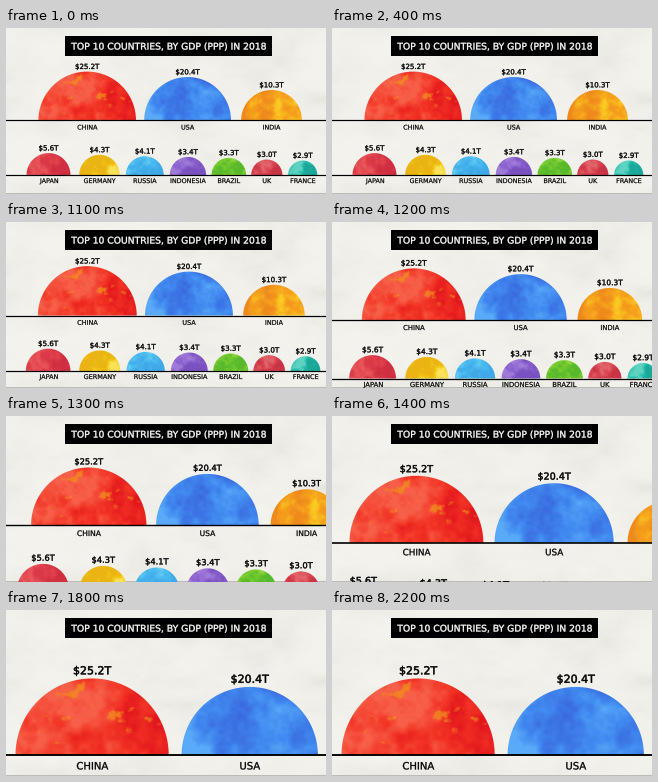
Animation, 320 px wide and 166 px high, one loop 2.3 s. Source, as a matplotlib script:

```python
import numpy as np
import matplotlib.pyplot as plt
from matplotlib.animation import FuncAnimation
from matplotlib.colors import LinearSegmentedColormap, to_rgb
from matplotlib.patches import PathPatch, Rectangle
from matplotlib.path import Path
from matplotlib.textpath import TextPath
from matplotlib.transforms import Affine2D

W, H, DPI = 320, 166, 100
FRAMES, STEP = 23, 100
PX = 72 / DPI
FOCUS_X, MAX_ZOOM = 72.6, 1.57
ZOOM_START, ZOOM_TIME = 960, 790
ROW1, ROW2 = 92.4, 147.1

rng = np.random.default_rng(18)

# name, value, centre x, radius, base line, angle of the light side, colours
COUNTRIES = [
    ("CHINA", "$25.2T", 81.2, 48.8, ROW1, 160, ("#f75f48", "#f23324", "#e3161d")),
    ("USA", "$20.4T", 181.6, 43.4, ROW1, 225, ("#59aaf8", "#4189f0", "#3a6be0")),
    ("INDIA", "$10.3T", 265.5, 30.4, ROW1, -35, ("#fbcb22", "#f6a01c", "#ee8a1c")),
    ("JAPAN", "$5.6T", 42.5, 22, ROW2, 150, ("#ea5a5c", "#de3d4a", "#cf2f40")),
    ("GERMANY", "$4.3T", 93.5, 20.3, ROW2, -40, ("#fae25a", "#f4c916", "#eab414")),
    ("RUSSIA", "$4.1T", 138.8, 18.9, ROW2, 150, ("#74d0f7", "#4cbdf1", "#3fa9e8")),
    ("INDONESIA", "$3.4T", 181.9, 18.2, ROW2, 150, ("#a17bd8", "#8b62cf", "#7a51c0")),
    ("BRAZIL", "$3.3T", 222.8, 17.3, ROW2, 150, ("#96d94c", "#76cb2e", "#58b92c")),
    ("UK", "$3.0T", 260.8, 15.6, ROW2, 150, ("#e2666c", "#d9434f", "#c83445")),
    ("FRANCE", "$2.9T", 296.7, 14.6, ROW2, 150, ("#5fd3c2", "#27bfae", "#1ba899")),
]


def noise(h, w, cells, octaves=4):
    """Smooth fractal noise scaled to 0..1."""
    total = np.zeros((h, w))
    for k in range(octaves):
        n = cells * 2 ** k
        grid = rng.random((n + 1, n + 1))
        y = np.linspace(0, n - 1e-6, h)[:, None]
        x = np.linspace(0, n - 1e-6, w)[None, :]
        j, i = y.astype(int), x.astype(int)
        fy, fx = (f * f * (3 - 2 * f) for f in (y - j, x - i))
        top = grid[j, i] * (1 - fx) + grid[j, i + 1] * fx
        low = grid[j + 1, i] * (1 - fx) + grid[j + 1, i + 1] * fx
        total += (top * (1 - fy) + low * fy) * 0.55 ** k
    return (total - total.min()) / np.ptp(total)


def wash(colors, size, angle):
    """Watercolour patch, with u and v running over the disc."""
    u, v = np.meshgrid(np.linspace(-1.1, 1.1, size), np.linspace(1.1, -1.1, size))
    a = np.radians(angle)
    light = u * np.cos(a) + (v - 0.45) * np.sin(a)
    tone = np.clip((noise(size, size, 5) - 0.5) * 1.7 + 0.6 - 0.6 * light, 0, 1)
    cmap = LinearSegmentedColormap.from_list("wash", colors)
    return cmap(tone)[..., :3], u, v


def add_gold(rgb, u, v):
    """Speckled gold vein across the red wash."""
    vein = [(-0.12, 0.92), (-0.2, 0.76), (-0.28, 0.62), (0.22, 0.5), (0.42, 0.42),
            (0.56, 0.56), (0.72, 0.48), (0.8, 0.3)]
    near = sum(np.exp(-((u - a) ** 2 + (v - b) ** 2) / 0.014) for a, b in vein)
    n = len(u)
    mask = np.clip((near * 0.4 + noise(n, n, 14) - 0.88) * 5, 0, 0.8)[..., None]
    return rgb * (1 - mask) + np.array(to_rgb("#f08c1e")) * mask


fig = plt.figure(figsize=(W / DPI, H / DPI), dpi=DPI)
ax = fig.add_axes([0, 0, 1, 1])
ax.set_xlim(0, W)
ax.set_ylim(H, 0)
ax.axis("off")

zoom, drift = Affine2D(), Affine2D()
stage = zoom + ax.transData
scaled = []


def add_text(s, x, y, size, color="black", weight=0.35, zooms=True):
    path = TextPath((0, 0), s, size=size, prop={"family": "DejaVu Sans"})
    box = path.get_extents()
    place = Affine2D().scale(1, -1).translate(x - (box.x0 + box.x1) / 2, y + 0.365 * size)
    patch = PathPatch(path.transformed(place), fc=color, ec=color, lw=weight * PX,
                      transform=stage if zooms else ax.transData, zorder=5)
    ax.add_artist(patch)
    if zooms:
        scaled.append((patch, weight * PX))


def add_country(name, value, x, r, base, angle, colors):
    rgb, u, v = wash(colors, int(r * 3.4), angle)
    if name == "CHINA":
        rgb = add_gold(rgb, u, v)
    m = r * 1.1
    im = ax.imshow(np.clip(rgb, 0, 1), extent=(x - m, x + m, base + m, base - m),
                   aspect="auto", interpolation="bilinear",
                   transform=drift + stage, zorder=2)
    a = np.linspace(0, np.pi, 91)
    dome = np.column_stack([x + r * np.cos(a), base - r * np.sin(a)])
    im.set_clip_path(Path(dome), transform=stage)
    add_text(value, x + 0.3, base - r - 5.2, 7)
    add_text(name, x + 0.3, base + (6.8 if base == ROW1 else 5.6), 6.4, weight=0.2)


paper = noise(H, W, 7, 5)[..., None]
paper = np.array(to_rgb("#f4f3ee")) * (1 - 0.055 * paper ** 2)
ax.imshow(paper, extent=(0, W, H, 0), aspect="auto", zorder=0)
ax.add_patch(Rectangle((0, H - 1), W, 1, fc="#bcbbb5", lw=0, zorder=1))

for row in COUNTRIES:
    add_country(*row)
for y in (ROW1, ROW2):
    line, = ax.plot([-100, 500], [y, y], color="black", transform=stage, zorder=4)
    scaled.append((line, 1.2 * PX))

ax.add_patch(Rectangle((59.3, 8.2), 206.4, 19.6, fc="black", lw=0, zorder=4))
add_text("TOP 10 COUNTRIES, BY GDP (PPP) IN 2018", 162.6, 18.2, 9.2, "white", 0.35, False)

ax.set_xlim(0, W)
ax.set_ylim(H, 0)


def ease(t):
    t = min(max(t, 0), 1)
    return 4 * t ** 3 if t < 0.5 else 1 - 4 * (1 - t) ** 3


def update(i):
    s = 1 + (MAX_ZOOM - 1) * ease((i * STEP - ZOOM_START) / ZOOM_TIME)
    zoom.clear().translate(-FOCUS_X, 0).scale(s).translate(FOCUS_X, 0)
    t = i / FRAMES
    drift.clear().translate(0.9 * t - 0.45, 0.6 - t)
    for artist, width in scaled:
        artist.set_linewidth(width * s)
    return []


anim = FuncAnimation(fig, update, frames=FRAMES, interval=STEP, repeat=True,
                     repeat_delay=0, blit=False)
plt.show()
```
